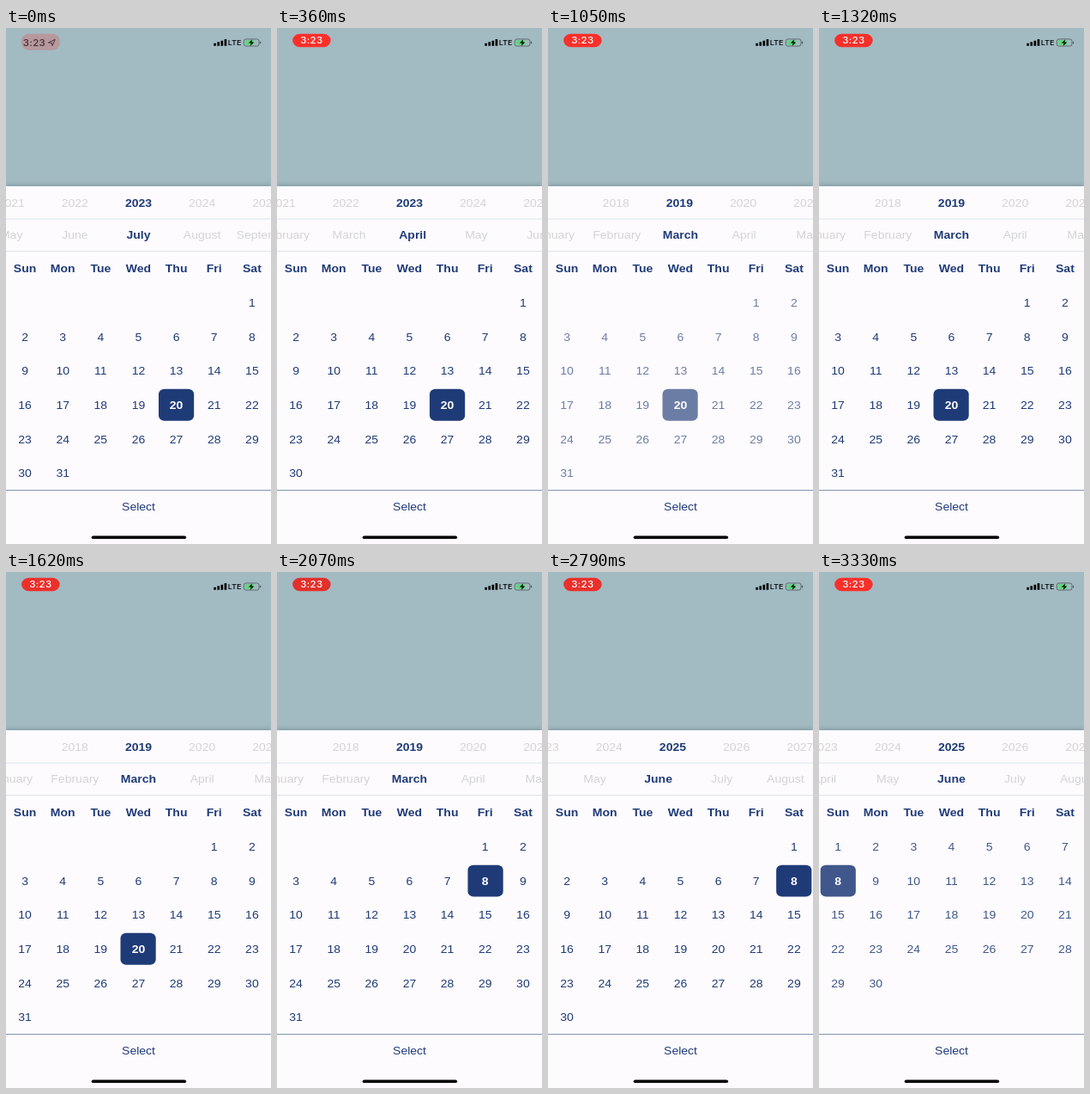
An HTML page for the animation above (3.36 s loop, 309 px wide and 600 px high).

```html
<!DOCTYPE html>
<html lang="en">
<head>
<meta charset="utf-8">
<title>Date picker</title>
<style>
  html, body { margin: 0; width: 100%; height: 100%; overflow: hidden; background: #a2bac2; }
  /* The phone screen is laid out in points and squeezed as a whole onto the stage. */
  #screen {
    position: absolute; left: 0; top: 0; width: 375px; height: 812px; overflow: hidden;
    transform: scale(calc(309 / 375), calc(600 / 812)); transform-origin: 0 0;
    font: 17px "Liberation Sans", Arial, sans-serif; color: #1f3b77; background: #a2bac2;
  }
  #screen > * { position: absolute; }
  #status { left: 0; top: 0; }
  #status text { font: 500 14px Inter, sans-serif; letter-spacing: .4px; }
  #status .net { font: 500 11px Inter, sans-serif; letter-spacing: 0; }
  #panel {
    left: 0; top: 249px; width: 375px; height: 563px; background: #fdfbfe;
    box-shadow: 0 -1px 7px rgba(40, 60, 70, .35);
  }
  .wheel { left: 0; width: 375px; height: 50px; overflow: hidden; border-bottom: 1px solid #cfdbe9; }
  #years { top: 250px; }
  #months { top: 301px; }
  .track { position: absolute; left: 142.5px; top: 0; }
  .track span {
    position: absolute; width: 90px; line-height: 52px; text-align: center;
    white-space: nowrap; color: #d3d3d7;
  }
  .track .on { color: #1f3b77; font-weight: bold; }
  #grid {
    left: 0; top: 352px; width: 375px; height: 375px;
    display: grid; grid-template: repeat(7, 1fr) / repeat(7, 1fr); place-items: center;
  }
  #grid span { width: 50px; height: 50px; line-height: 52px; text-align: center; border-radius: 8px; }
  #grid .head { font-weight: bold; }
  #grid .out { color: #333; }
  #grid .sel { background: #1f3b77; color: #fff; font-weight: bold; }
  #select {
    left: 0; top: 726.8px; width: 375px; line-height: 52px; text-align: center;
    border-top: 1.35px solid #5c7199;
  }
  #home { left: 120.5px; top: 799px; width: 134px; height: 5px; border-radius: 3px; background: #000; }
</style>
</head>
<body>
<div id="screen">
  <svg id="status" width="375" height="44">
    <rect id="pill" x="22" y="9" width="54" height="21" rx="10.5"/>
    <g id="idle" fill="#33242e">
      <text x="24" y="28">3:23</text>
      <path d="M60 23 L69.5 18 L65.5 28 L64.8 23.6 Z" fill="none" stroke="#33242e" stroke-width="1.2"/>
    </g>
    <text id="live" x="49" y="25" text-anchor="middle" fill="#fff">3:23</text>
    <path d="M294 24h3.2v4h-3.2z M299 22h3.2v6h-3.2z M304 20h3.2v8h-3.2z M309 17.5h3.2v10.5h-3.2z"/>
    <text class="net" x="323.5" y="27" text-anchor="middle">LTE</text>
    <rect x="336.5" y="17.5" width="21.5" height="11" rx="3" fill="none" stroke="#4b5557"/>
    <path d="M359.3 21v4q1.5-.5 1.5-2t-1.5-2z" fill="#4b5557"/>
    <rect x="338.3" y="19.3" width="13" height="7.4" rx="1.5" fill="#5fd67c"/>
    <path d="M348.5 17.8l-5.2 6h3.4l-1.2 4.6 5.4-6.2h-3.5z"/>
  </svg>
  <div id="panel"></div>
  <div id="years" class="wheel"></div>
  <div id="months" class="wheel"></div>
  <div id="grid"></div>
  <div id="select">Select</div>
  <div id="home"></div>
</div>
<script>
const LOOP = 3360, STEP = 30, ITEM = 90;
const $ = id => document.getElementById(id);
const clamp = v => Math.min(1, Math.max(0, v));
const ramp = (t, from, len) => clamp((t - from) / len);

const MONTHS = ['January', 'February', 'March', 'April', 'May', 'June', 'July',
  'August', 'September', 'October', 'November', 'December'];
const YEARS = Array.from({ length: 11 }, (_, i) => 2018 + i);

// A flick starts softly, then decays exponentially towards its target.
function flick(t, start, dist) {
  const u = Math.max(0, t - start);
  return dist * (1 - Math.exp(-u * u / (90 * (u + 60))));
}

const yearPos = t => 5 + flick(t, 495, -4) + flick(t, 2150, 6.29) + flick(t, 2680, -.29);
const monthPos = t => 6 + flick(t, 186, -4) + flick(t, 2130, 3.78) + flick(t, 2680, -.78);

// Month pages: start, fade-in length, optional start of the staggered fade-out.
const PAGES = [
  { at: 0, year: 2023, month: 6, day: 20 },
  { at: 340, year: 2023, month: 3, day: 20, out: 448 },
  { at: 920, fade: 200, year: 2019, month: 2, day: 20 },
  { at: 1830, year: 2019, month: 2, day: 8, out: 2230 },
  { at: 2560, fade: 150, year: 2024, month: 5, day: 8, out: 2830 },
  { at: 3160, fade: 200, year: 2025, month: 5, day: 8 }
];

function add(parent, text, cls = '') {
  const el = document.createElement('span');
  el.textContent = text;
  el.className = cls;
  return parent.appendChild(el);
}

function makeWheel(id, labels) {
  const track = document.createElement('div');
  track.className = 'track';
  $(id).append(track);
  const items = labels.map((label, i) => {
    const el = add(track, label);
    el.style.left = i * ITEM + 'px';
    return el;
  });
  return pos => {
    track.style.transform = `translateX(${-pos * ITEM}px)`;
    items.forEach((el, i) => el.classList.toggle('on', i === Math.round(pos)));
  };
}

const setYear = makeWheel('years', YEARS);
const setMonth = makeWheel('months', MONTHS);
['Sun', 'Mon', 'Tue', 'Wed', 'Thu', 'Fri', 'Sat'].forEach(d => add($('grid'), d, 'head'));
const cells = Array.from({ length: 42 }, () => add($('grid'), ''));

function drawGrid(t) {
  const page = PAGES.filter(p => p.at <= t).pop();
  const { at, fade, out, year, month, day } = page;
  const first = new Date(year, month, 1).getDay();
  const count = new Date(year, month + 1, 0).getDate();
  const shown = fade ? ramp(t, at, fade) : 1;
  cells.forEach((el, i) => {
    const n = i - first + 1;
    const valid = n > 0 && n <= count;
    const gone = out ? ramp(t, out + i * 5, 100) : 0;
    el.textContent = valid ? n : '';
    el.className = valid && n === day ? 'sel' : gone > 0 ? 'out' : '';
    el.style.opacity = shown * (1 - gone);
  });
}

function drawStatus(t) {
  const live = ramp(t, 0, 240);
  const glow = .5 + .5 * Math.cos((t - 690) / 1560 * Math.PI);
  const pill = $('pill');
  pill.setAttribute('fill', `rgb(${226 + 29 * glow}, 48, 42)`);
  pill.setAttribute('height', 26 - 5 * live);
  pill.style.opacity = .25 + .75 * live;
  $('live').style.opacity = live;
  $('idle').style.opacity = .9 * (1 - live);
}

function frame() {
  const t = Math.floor(performance.now() % LOOP / STEP) * STEP;
  setYear(yearPos(t));
  setMonth(monthPos(t));
  drawGrid(t);
  drawStatus(t);
  requestAnimationFrame(frame);
}
frame();
</script>
</body>
</html>
```
